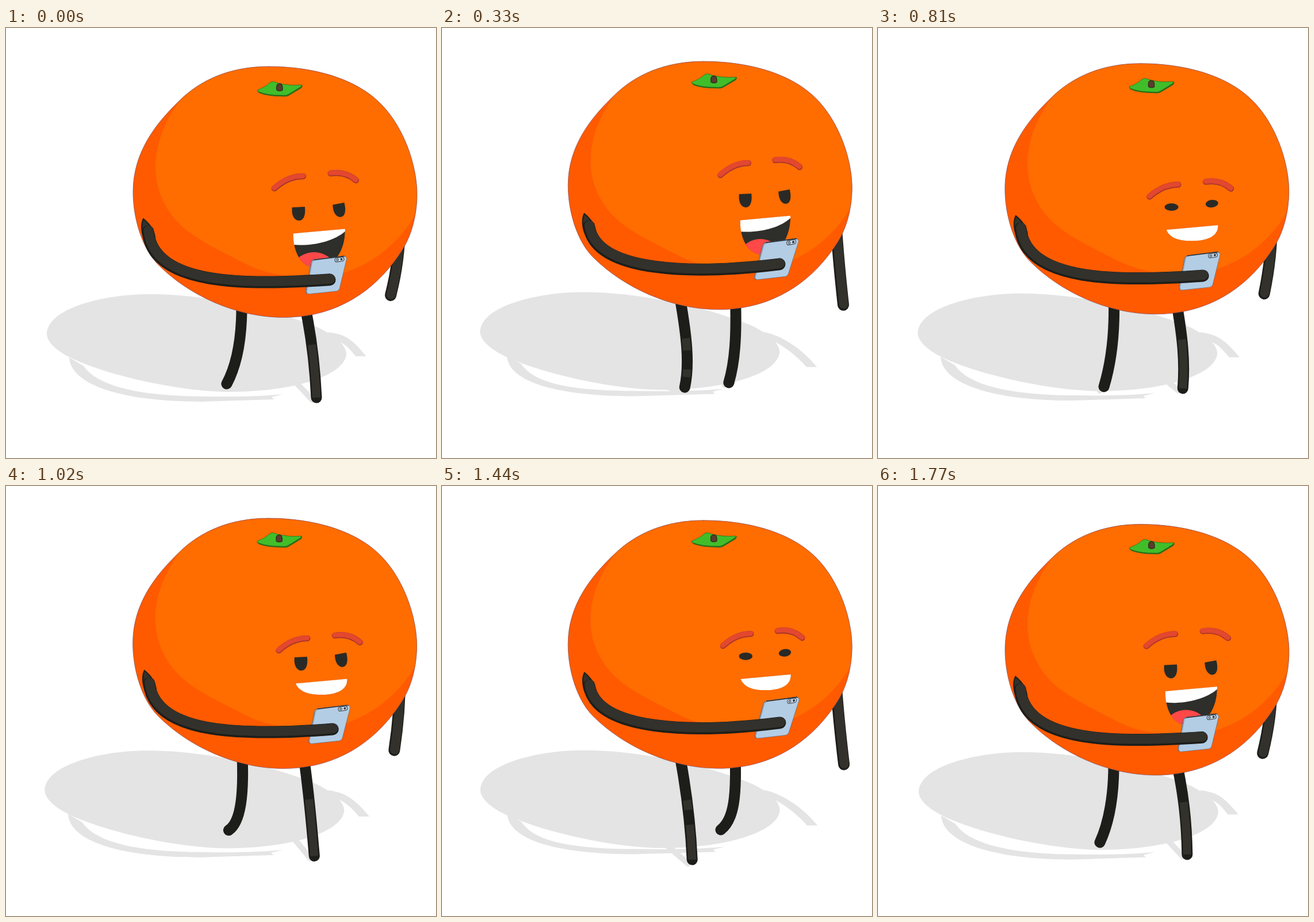
These frames come from a looping animation (748x748 px, 1800 ms). An HTML page:

```html
<!DOCTYPE html>
<html lang="en">
<head>
<meta charset="utf-8">
<title>Walking orange</title>
<style>
html, body { margin: 0; width: 100%; height: 100%; overflow: hidden; background: #fff; }
svg { display: block; width: 100vw; height: 100vh; }
</style>
</head>
<body>
<svg id="stage" viewBox="0 0 748 748"></svg>
<script>
const stage = document.getElementById('stage');
const LOOP = 1800, STEP = 900, TICK = 30;
const DARK = '#1d1e1a', SOFT = '#32312c';

const mix = (a, b, k) => a + (b - a) * k;
const ramp = (t, a, b) => {
  const k = Math.min(1, Math.max(0, (t - a) / (b - a)));
  return k * k * (3 - 2 * k);
};
const wave = (t, lead, period = STEP) => Math.cos(2 * Math.PI * (t + lead) / period);

// smooth periodic curve through [time, value] pairs
function curve(t, keys) {
  const n = keys.length;
  const key = i => {
    const [kt, v] = keys[(i + n) % n];
    return [kt + STEP * Math.floor(i / n), v];
  };
  let i = n - 1;
  while (keys[i][0] > t) i--;
  const [p, a, b, q] = [key(i - 1), key(i), key(i + 1), key(i + 2)];
  const d = b[0] - a[0], k = (t - a[0]) / d;
  const m0 = (b[1] - p[1]) / (b[0] - p[0]) * d;
  const m1 = (q[1] - a[1]) / (q[0] - a[0]) * d;
  return a[1] + k * m0 + k * k * (3 * (b[1] - a[1]) - 2 * m0 - m1)
    + k * k * k * (2 * (a[1] - b[1]) + m0 + m1);
}

const FOOT_A = [[0, 619], [90, 601], [210, 600], [330, 625], [420, 644], [495, 652], [540, 650], [660, 637], [810, 624], [870, 620]];
const FOOT_B = [[0, 643], [45, 650], [150, 640], [330, 617], [450, 610], [540, 598], [660, 597], [810, 627], [870, 641]];

const fill = (d, color, extra = '') => `<path d="${d}" fill="${color}" ${extra}/>`;
const line = (d, color, w, extra = '') =>
  `<path d="${d}" fill="none" stroke="${color}" stroke-width="${w}" stroke-linecap="round" ${extra}/>`;
const group = (transform, ...parts) => `<g transform="${transform}">${parts.join('')}</g>`;

function limb(d, w, dx, dy) {
  return line(d, DARK, w) + group(`translate(${dx} ${dy})`, line(d, SOFT, w - 4));
}

function leg(d, dashes) {
  const lit = dashes
    ? `<path d="${d}" fill="none" stroke="${SOFT}" stroke-width="14" pathLength="100" stroke-dasharray="${dashes}"/>` : '';
  return line(d, DARK, 19) + lit;
}

function shadow(c, bob, a, b) {
  const sx = .3 * (bob - 67) + 1.2 * (c - 1), sy = sx * .75;
  const e = 8 * (1 - c), f = 3.5 * (c - 1), s = e * .55;
  const hx = 632.5 - 15 * c, hy = 581 - 11 * c;
  const G = '#e4e4e4';
  return group(`translate(${sx} ${sy})`,
    fill('M71 530C75 487 170 463 250 463C350 463 470 490 545 522C575 537 592 552 592 568C588 605 500 633 385 633C300 632 180 605 115 575C85 560 70 545 71 530Z', G),
    fill(`M${110 + s} 573C${112 + s} 620 ${200 + s} ${650 + f} 340 ${650 + f}L${466 + e} ${646 + f}L${462 + e} ${642 + f}L${482 + e} ${637 + f}
      C${440 + e} ${641 + f} 400 ${642 + f} 350 ${641 + f}C240 ${641 + f} ${160 + s} 625 ${135 + s} 588Z`, G)) +
    fill(`M560 529C585 533 ${hx - 20} ${hy - 35} ${hx + 9} ${hy + 1}L${hx - 9} ${hy + 1}C${hx - 25} ${hy - 18} 590 549 568 541Z`, G) +
    line(`M390 624L${a.x - 7} ${a.y + 7}`, G, 10) +
    line(`M500 612L${b.x - 7} ${b.y + 4}`, G, 10);
}

function body(c, bob) {
  const outline = 'M457 67C530 67 607 86 652 132C692 172 716 240 715 293C714 335 702 366 690 385C645 457 575 503.5 483 503.5C400 503.5 318 465 265 412C237 384 221 332 221 285C221 215 262 165 300 128C338 90 390 67 457 67Z';
  return group(`translate(${c - 1} ${bob}) scale(1 ${1 + .0065 * (c - 1)}) translate(0 -67)`,
    `<clipPath id="skin"><path d="${outline}"/></clipPath>`,
    fill(outline, '#ff5a00'),
    fill('M308 120C258 180 253 245 267 285C290 350 335 368 420 412C470 436 540 440 590 425C650 405 690 365 716 318L740 40L320 40Z', '#ff6c00', 'clip-path="url(#skin)"'),
    line(outline, '#804a60', .7),
    group(`translate(${.7 * (c - 1)} ${2.6 * (c - 1)})`,
      fill('M437 109Q452 103 457 97Q463 91 470 95Q490 101 515 99Q517 102 513 105L493 117Q489 120 480 119Q455 119 440 113Z', '#286a18'),
      fill('M437 108Q452 102 457 97Q463 91 470 95Q490 101 515 99Q514 102 510 104L492 115Q488 118 480 117Q455 117 440 111Z', '#41bd2a', 'stroke="#2c7020" stroke-width=".7"'),
      fill('M471 108Q469 97 476 97Q482 97 481 108Q476 111 471 108Z', '#5b3c2c', 'stroke="#33251c" stroke-width="1.2"')));
}

function face(c, bob, t) {
  const smile = ramp(t, 600, 690) - ramp(t, 1530, 1620);
  const squint = (t >= 720 && t < 900) || (t >= 1380 && t < 1530);
  const m = (a, b) => mix(a, b, smile);
  const eye = squint
    ? '<ellipse cy="-4" rx="12" ry="6.5" fill="#292a26"/>'
    : fill('M-11 -10L11 -11C13 5 8 13 1 13C-7 13 -13 4 -11 -10Z', '#292a26');
  const brow = d => line(d, '#a8352b', 10.5) + group('translate(-.3 -.8)', line(d, '#e3472f', 8.5));
  const lips = `M-9 35.5L81 27.5C82 ${m(60, 48)} ${m(66, 60)} ${m(95, 55)} ${m(30, 35)} ${m(95, 55)}C${m(6, 10)} ${m(95, 55)} ${m(-10, -4)} ${m(70, 48)} -9 35.5Z`;
  const drop = smile * 32;
  return group(`translate(${519.8 - 11 * c} ${bob + 246.8 + 8.3 * c}) scale(${1 + .018 * (c - 1)} 1)`,
    group(`translate(${4 * smile + 1.5 * (c - 1)} ${21 * smile})`,
      brow('M-42 -43Q-19 -64 8 -64'), brow('M56 -69Q82 -73 100 -57')),
    eye,
    group('translate(71 -6) rotate(-8) scale(.93 1)', eye),
    `<clipPath id="lips"><path d="${lips}"/></clipPath>`,
    `<g clip-path="url(#lips)">`,
    fill(lips, '#2e2e2a'),
    '<ellipse cx="27" cy="93" rx="34" ry="25" fill="#ff4848"/>',
    fill(`M-12 30L84 20L82 ${31 + drop}C62 ${49 + drop} 25 ${58 + drop} -10 ${55 + drop}Z`, '#fff'),
    '</g>');
}

function phone(x, y, c) {
  const shell = 'M-29 -35L21 -41Q26 -41 25 -36L13 14Q12 18 8 19L-40 24Q-45 24 -44 19L-35 -30Q-34 -34 -29 -35Z';
  return group(`translate(${x} ${y}) skewX(${3.2 * (c - 1)}) scale(1 ${1 - .05 * (c - 1)})`,
    fill(shell, '#d9e5f0', 'stroke="#4c5c70" stroke-width="1"'),
    group('translate(1.3 .8)', fill(shell, '#b3cde5', 'stroke="#52657c" stroke-width=".6"')),
    line('M-30 -34.5L22 -41', '#24272a', 1.2),
    group('translate(14 -35) rotate(-9)',
      '<rect x="-8" y="-3.5" width="16" height="7" rx="3.5" fill="#c9d9e6" stroke="#333b44"/>',
      '<circle cx="-3.5" r="2" fill="#8ba0b5" stroke="#333b44" stroke-width=".7"/>',
      '<circle cx="3.5" r="2" fill="#333b44"/>'));
}

function draw(now) {
  const t = Math.floor(now % LOOP / TICK) * TICK, p = t % STEP;
  const c = wave(p, 8), swing = wave(p, -37.5);
  const bob = 58 + 9 * wave(p, 8, STEP / 2);

  const a = { x: 410 - 27 * swing, y: curve(p, FOOT_A) };
  const b = { x: 512 + 29 * swing, y: curve(p, FOOT_B) };
  const legA = `M${413 - 3 * c} ${bob + 418}C${419 - 9 * c} 536 ${419 - 17 * c} 585 ${a.x} ${a.y}`;
  const legB = `M${515 + 6 * c} ${bob + 421}C${520 + 11 * c} 536 ${521 + 16 * c} 580 ${b.x} ${b.y}`;
  const litA = c < 0 && (p < 420 ? '0 43 14 22 9 100' : '0 40 10 15 36 100');
  const litB = c > 0 && '0 41 60 100';

  const far = `M685 ${bob + 275}Q${687 - 2 * c} ${bob + 335} ${686 - 17 * c} ${bob + 413 - 15 * c}`;
  const hx = 580 - 14 * c, hy = bob + 360.3 + 10.6 * c;
  const sx = 252 - 5 * c, sy = bob + 287;
  const near = `M${sx} ${sy}C${263 - 7 * c} ${bob + 374 + 9 * c} ${430 - 10 * c} ${bob + 375 + 5 * c} ${hx - 3} ${hy}`;
  const horn = 'M-8 -22C-13 -12 -11 4 -6 14L12 10C10 -4 2 -14 -8 -22Z';

  stage.innerHTML = shadow(c, bob, a, b)
    + leg(legB, litB) + leg(legA, litA)
    + limb(far, 20, .8, -1.2)
    + body(c, bob) + face(c, bob, t) + phone(hx, hy, c)
    + group(`translate(${sx} ${sy})`, fill(horn, SOFT, `stroke="${DARK}" stroke-width="2"`))
    + limb(near, 21, .8, -1.5);
}

const start = performance.now();
function frame() {
  draw(performance.now() - start);
  requestAnimationFrame(frame);
}
frame();
</script>
</body>
</html>
```
